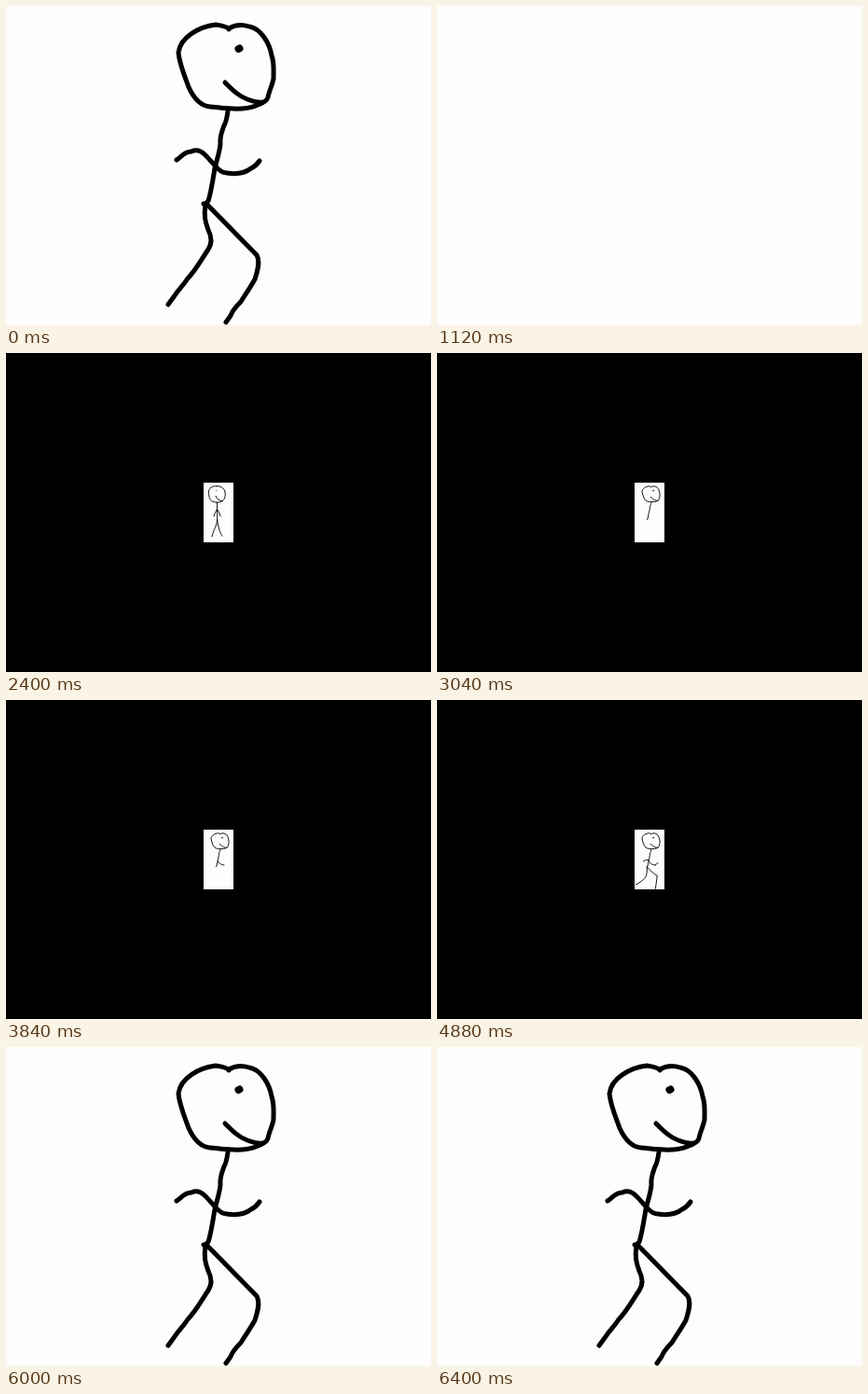
Animation, 456 px wide and 342 px high, one loop 7440 ms. Source, as an HTML page:

```html
<!DOCTYPE html>
<html lang="en">
<head>
<meta charset="utf-8">
<title>Stick figure flipbook</title>
<style>
  html, body { margin: 0; width: 100%; height: 100%; overflow: hidden; background: #fdfdfd; }
  svg { display: block; width: 456px; height: 342px; }
  path { fill: none; stroke: #000; stroke-width: 5; stroke-linecap: round; stroke-linejoin: round; }
  .eye { stroke-width: 8; }
</style>
</head>
<body>
<svg viewBox="0 0 456 342">
  <g id="desk">
    <rect width="456" height="342" fill="#000"/>
    <rect x="212" y="139" width="32" height="64" fill="#fdfdfd"/>
  </g>
  <g id="ink"></g>
</svg>
<script>
const LOOP = 7440, STEP = 80;
const ERASE = 1120, ZOOM_OUT = 1600, ZOOM_IN = 6000;
const PAUSES = [1840, 2320, 2880, 3360, 5760];
const SCALE = 64 / 342;
const SMALL = `translate(${228 * (1 - SCALE)} 139) scale(${SCALE})`;

const head = 'M239 25Q238 22 225 20C208 22 187 33 185 50C186 62 192 76 196 87C201 98 208 107 219 108' +
  'C232 109 253 113 268 107C274 105 280 102 281 98C282 92 286 84 287 78C287 69 288 61 285 53' +
  'C283 41 274 24 261 22C252 19 244 21 239 24';
const eye = 'M249.5 46l1 -.5';
const mouth = 'M235 82C243 90 250 97 259 100C264 102 270 104 276 103';
const body = 'M238 113C237 120 236 125 234 128C232 134 229 140 230 148C229 158 226 165 224 174' +
  'C222 186 220 200 217 209L213 213';

// Each stroke: path, first step, last step, optional class
const pages = [
  { from: 1680, to: 2480, strokes: [
    ['M218 20C190 18 171 32 172 56C172 80 178 110 206 111C238 119 266 104 267 70C268 38 248 18 218 20', 1680, 1920],
    ['M216 47l1 0', 2000, 2000],
    ['M212 77C218 92 232 104 250 106', 2000, 2000],
    ['M220 113L221 214', 2080, 2080],
    ['M221 214C217 240 211 256 204 268C198 284 194 296 190 309', 2160, 2160],
    ['M221 214C224 240 231 268 237 282C242 294 246 300 249 306', 2240, 2240],
    ['M220 152C214 162 205 178 202 192M220 152C227 162 236 178 239 192', 2400, 2400]
  ] },
  { from: 2480, to: 3440, zoomed: true, strokes: [
    [head, 2480, 2720],
    [eye, 2800, 2800, 'eye'],
    [mouth, 2960, 2960],
    [body, 3040, 3040],
    ['M183 165C188 162 191 156 199 156C205 153 210 156 214 160C218 164 223 170 226 173' +
     'C229 176 231 179 237 179C250 181 258 178 263 174C267 172 270 169 272 166', 3120, 3120],
    ['M214 213C212 225 214 232 217 240C221 248 221 255 217 261C210 271 204 283 195 292' +
     'C190 300 185 304 182 309L174 320', 3200, 3200],
    ['M212 212L215 212L269 267C273 274 270 284 267 293C262 302 257 309 252 317' +
     'C247 322 243 326 241 332L236 339', 3280, 3280]
  ] },
  { from: 3440, to: 5040, strokes: [
    [head, 3440, 3520],
    [eye, 3600, 3600, 'eye'],
    [mouth, 3680, 3680],
    [body, 3760, 3760],
    ['M225 180C230 190 236 200 260 203', 3840, 3840],
    ['M260 203C267 200 271 196 275 190', 3920, 3920],
    ['M214 213C228 232 250 250 272 264C270 285 266 310 262 338', 4000, 4320],
    ['M214 213C214 240 214 258 204 274C190 290 170 305 150 316', 4400, 4720],
    ['M224 175C208 170 194 178 180 194', 4800, 4960]
  ] },
  { from: 5040, to: ZOOM_IN, strokes: [
    [head, 5040, 5200],
    [eye, 5280, 5280, 'eye'],
    [mouth, 5360, 5360],
    [body, 5440, 5520],
    ['M223 178C212 174 200 176 188 187', 5600, 5600],
    ['M214 213C210 236 216 256 224 272C216 288 202 296 187 302', 5680, 5680],
    ['M214 213C224 230 236 246 242 262C236 276 226 290 218 308C204 320 190 334 174 340', 5840, 5920]
  ] }
];

const desk = document.getElementById('desk');
const ink = document.getElementById('ink');

for (const page of pages) {
  page.paths = page.strokes.map(([d, , , name]) => {
    const path = document.createElementNS(ink.namespaceURI, 'path');
    path.setAttribute('d', d);
    if (name) path.setAttribute('class', name);
    ink.append(path);
    path.size = path.getTotalLength();
    return path;
  });
}

function reveal(path, part) {
  path.style.display = part > 0 ? '' : 'none';
  path.style.strokeDasharray = part < 1 ? `${path.size * part} ${path.size * 2}` : 'none';
}

function draw(ms) {
  let t = Math.floor((ms % LOOP) / STEP) * STEP;
  if (PAUSES.includes(t)) t -= STEP;
  const big = t < ZOOM_OUT || t >= ZOOM_IN;
  const erased = t >= ERASE && t < ZOOM_OUT;

  desk.style.display = big ? 'none' : '';
  ink.setAttribute('transform', big ? '' : SMALL);
  for (const page of pages) {
    const open = big ? page.zoomed && !erased : t >= page.from && t < page.to;
    page.strokes.forEach(([, start, end], i) => {
      const part = big ? 1 : (t - start + STEP) / (end - start + STEP);
      reveal(page.paths[i], open ? Math.min(1, part) : 0);
    });
  }
}

const began = performance.now();
function tick() {
  draw(performance.now() - began);
  requestAnimationFrame(tick);
}
tick();
</script>
</body>
</html>
```
